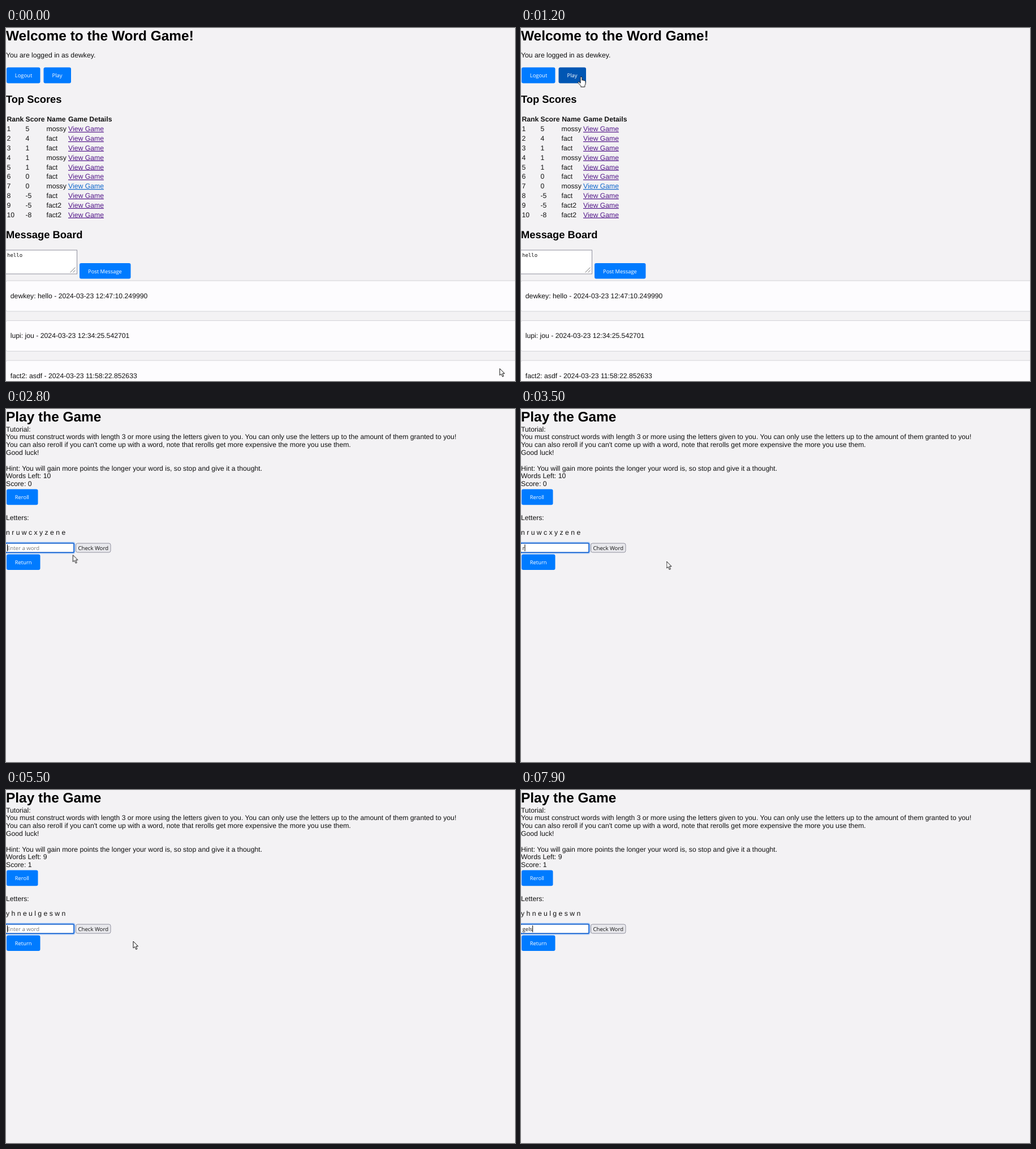
An HTML page that plays this animation: 900 px wide and 623 px high, repeating every 8000 ms.

```html
<!DOCTYPE html>
<html lang="en">
<head>
<meta charset="utf-8">
<title>Word Game</title>
<style>
html, body { margin: 0; width: 100%; height: 100%; overflow: hidden; background: #f3f2f4; }
svg { display: block; width: 900px; height: 623px; }
text { font: 12.22px "Liberation Sans", Arial, sans-serif; fill: #111; text-rendering: geometricPrecision; white-space: pre; }
.h1 { font-size: 24.44px; font-weight: bold; fill: #000; }
.h2 { font-size: 18.33px; font-weight: bold; fill: #000; }
.th { font-weight: bold; }
.link { fill: #551a8b; text-decoration: underline; }
.fresh { fill: #0f66cc; }
.mono { font: 9px "DejaVu Sans Mono", monospace; }
.btn { fill: #007bff; }
.label { font: 9.4px "Open Sans", "Noto Sans", sans-serif; fill: #fff; }
.field { font: 9.6px "Open Sans", "Noto Sans", sans-serif; }
.hint { fill: #777; }
.card { fill: #fdfcfe; stroke: #d3d3d7; }
.box { fill: #fff; stroke: #8f8f9d; }

/* 100 ms is 1.25% of the loop */
.home, .game, .cursor, .point, .hand, .arrow, .play, .focus, .caret {
  animation: 8s step-end -.03s infinite;
}
.home { animation-name: home; }
.game { animation-name: game; }
.play { animation-name: hover; }
.arrow { animation-name: arrow; }
.hand { animation-name: hand; }
.cursor { animation-name: hide; }
.focus { animation-name: focus; }
.caret { animation-name: blink; }
.point { animation-name: travel; }

@keyframes home { 0% { opacity: 1 } 16.25%, 100% { opacity: 0 } }
@keyframes game { 0% { opacity: 0 } 16.25%, 100% { opacity: 1 } }
@keyframes hover { 0% { fill: #007bff } 11.25%, 100% { fill: #0056b3 } }
@keyframes hand { 0% { opacity: 0 } 11.25% { opacity: 1 } 16.25%, 100% { opacity: 0 } }
@keyframes arrow { 0% { opacity: 1 } 11.25% { opacity: 0 } 16.25%, 100% { opacity: 1 } }
@keyframes hide { 0% { opacity: 1 } 45% { opacity: 0 } 51.25% { opacity: 1 } 88.75%, 100% { opacity: 0 } }
@keyframes focus { 0% { opacity: 0 } 33.75%, 100% { opacity: 1 } }
@keyframes blink {
  0% { opacity: 0 } 33.75% { opacity: 1 } 40% { opacity: 0 } 43.75% { opacity: 1 }
  53.75% { opacity: 0 } 58.75% { opacity: 1 } 62.5% { opacity: 0 } 68.75% { opacity: 1 }
  75% { opacity: 0 } 81.25%, 100% { opacity: 1 }
}
@keyframes travel {
  0% { transform: translate(873px, 601px); animation-timing-function: steps(2) }
  2.5% { transform: translate(770px, 525px); animation-timing-function: steps(4) }
  7.5% { transform: translate(270px, 185px); animation-timing-function: steps(3) }
  11.25%, 23.75% { transform: translate(106.5px, 86px) }
  25% { transform: translate(101px, 85.5px); animation-timing-function: steps(5) }
  31.25%, 32.5% { transform: translate(85px, 243px); animation-timing-function: steps(3) }
  36.25% { transform: translate(135px, 265px); animation-timing-function: steps(3) }
  40% { transform: translate(235px, 297px); animation-timing-function: steps(2) }
  42.5% { transform: translate(257.5px, 269px) }
  50% { transform: translate(257.5px, 269px); animation-timing-function: steps(4) }
  55%, 56.25% { transform: translate(160px, 245px) }
  57.5% { transform: translate(186.5px, 263.5px); animation-timing-function: steps(3) }
  61.25% { transform: translate(205px, 262px); animation-timing-function: steps(6) }
  68.75% { transform: translate(225px, 267px) }
  70% { transform: translate(225px, 267px); animation-timing-function: steps(6) }
  77.5%, 100% { transform: translate(259px, 291px) }
}
</style>
</head>
<body>
<svg viewBox="0 0 900 623">
  <g class="home">
    <text class="h1" x="0" y="22.2">Welcome to the Word Game!</text>
    <text x="0" y="52">You are logged in as dewkey.</text>
    <rect class="btn" x="1" y="69.5" width="59.5" height="28" rx="3"/>
    <text class="label" x="15.8" y="87.2">Logout</text>
    <rect class="btn play" x="66.5" y="69.5" width="48.5" height="28" rx="3"/>
    <text class="label" x="81.5" y="87.2">Play</text>
    <text class="h2" x="0" y="132.4">Top Scores</text>
    <g id="scores">
      <text class="th" x="1.5" y="165.3">Rank</text>
      <text class="th" x="34.5" y="165.3">Score</text>
      <text class="th" x="72.3" y="165.3">Name</text>
      <text class="th" x="110" y="165.3">Game Details</text>
    </g>
    <text class="h2" x="0" y="371.3">Message Board</text>
    <rect class="box" x="-.5" y="392" width="126" height="42"/>
    <text class="mono" x="2" y="404">hello</text>
    <path d="M113.5 431.5l9-9M118.5 431.5l4-4" stroke="#777" fill="none"/>
    <rect class="btn" x="130" y="415" width="90.5" height="27.5" rx="3"/>
    <text class="label" x="145" y="432.5">Post Message</text>
    <g id="posts"></g>
  </g>

  <g class="game">
    <text class="h1" x="0" y="22.2">Play the Game</text>
    <g id="tutorial"></g>
    <text x="0" y="122.4">Words Left: <tspan id="left">10</tspan></text>
    <text x="0" y="136.2">Score: <tspan id="score">0</tspan></text>
    <rect class="btn" x="1" y="141.5" width="55.5" height="27.7" rx="3"/>
    <text class="label" x="15.8" y="159.2">Reroll</text>
    <text x="0" y="195.9">Letters:</text>
    <text id="letters" x="0" y="221.8"></text>
    <rect class="box" x="-.5" y="237" width="120.5" height="16" rx="2"/>
    <g class="focus" fill="none">
      <rect x="-2" y="235.3" width="123.7" height="19.4" rx="3" stroke="#a9c9f4" stroke-width="1.4"/>
      <rect x="-1" y="236.8" width="121.2" height="16.4" rx="2" stroke="#0a60d8" stroke-width="1.6"/>
    </g>
    <text class="field hint" id="hint" x="2" y="248.8">Enter a word</text>
    <text class="field" id="word" x="2.5" y="248.8"></text>
    <g class="caret"><rect id="caret" y="239" width="1" height="12"/></g>
    <rect x="123.5" y="237" width="61.5" height="16" rx="3" fill="#e9e9ed" stroke="#8f8f9d"/>
    <text class="field" x="127.5" y="248.8">Check Word</text>
    <rect class="btn" x="1" y="256.5" width="59.5" height="27.5" rx="3"/>
    <text class="label" x="15.8" y="274">Return</text>
  </g>

  <g class="cursor"><g class="point" fill="#fff" stroke="#111" stroke-linejoin="round">
    <path class="arrow" d="M0 0V12L2.8 9.6L4.9 14.4L6.9 13.5L4.9 8.8H8.6Z"/>
    <path class="hand" d="M-1.4 10V1.4a1.4 1.4 0 0 1 2.8 0V6.2q1.4-1 2.4.3q1.5-.7 2.2.6q1.6-.3 1.6 1.4V12q0 2-1.4 3.6V18H-.6V16.2L-5.6 10.6q-.6-1.6.8-1.8q1 0 3.4 2.6Z"/>
  </g></g>
</svg>
<script>
const LOOP = 8000;
const $ = id => document.getElementById(id);
const label = (x, y, s, cls = '') => `<text class="${cls}" x="${x}" y="${y}">${s}</text>`;

const scores = [[5, 'mossy'], [4, 'fact'], [1, 'fact'], [1, 'mossy'], [1, 'fact'],
  [0, 'fact'], [0, 'mossy'], [-5, 'fact'], [-5, 'fact2'], [-8, 'fact2']];
$('scores').insertAdjacentHTML('beforeend', scores.map(([points, name], i) => {
  const y = 182.2 + 16.83 * i;
  return label(1.5, y, i + 1) + label(34.4, y, points) + label(71.5, y, name) +
    label(110, y, 'View Game', i === 6 ? 'link fresh' : 'link');
}).join(''));

const posts = ['dewkey: hello - 2024-03-23 12:47:10.249990',
  'lupi: jou - 2024-03-23 12:34:25.542701',
  'fact2: asdf - 2024-03-23 11:58:22.852633'];
$('posts').innerHTML = posts.map((s, i) => {
  const y = 446 + 70.4 * i;
  return `<rect class="card" x="-.5" y="${y}" width="910" height="54" rx="3"/>` +
    label(7.8, y + 30.9, s);
}).join('');

const tutorial = ['Tutorial:',
  'You must construct words with length 3 or more using the letters given to you. You can only use the letters up to the amount of them granted to you!',
  "You can also reroll if you can't come up with a word, note that rerolls get more expensive the more you use them.",
  'Good luck!', '',
  'Hint: You will gain more points the longer your word is, so stop and give it a thought.'];
$('tutorial').innerHTML = tutorial.map((s, i) => label(0, 39.5 + 13.82 * i, s)).join('');

// [time, text in the field]
const typing = [[0, ''], [3500, 'r'], [3600, 'ru'], [3800, 'run'], [4500, ''],
  [7000, 'g'], [7200, 'ge'], [7500, 'gel'], [7900, 'gels']];

function draw(t) {
  const word = typing.findLast(([at]) => at <= t)[1];
  const scored = t >= 4500;
  $('word').textContent = word;
  $('hint').style.opacity = word ? 0 : 1;
  $('caret').setAttribute('x', 2 + (word ? $('word').getComputedTextLength() + .5 : 0));
  $('left').textContent = scored ? 9 : 10;
  $('score').textContent = scored ? 1 : 0;
  $('letters').textContent = [...(scored ? 'yhneulgeswn' : 'nruwcxyzene')].join(' ');
}

let start;
function tick(now) {
  start ??= now;
  draw((now - start + 30) % LOOP);
  requestAnimationFrame(tick);
}
draw(0);
requestAnimationFrame(tick);
</script>
</body>
</html>
```
